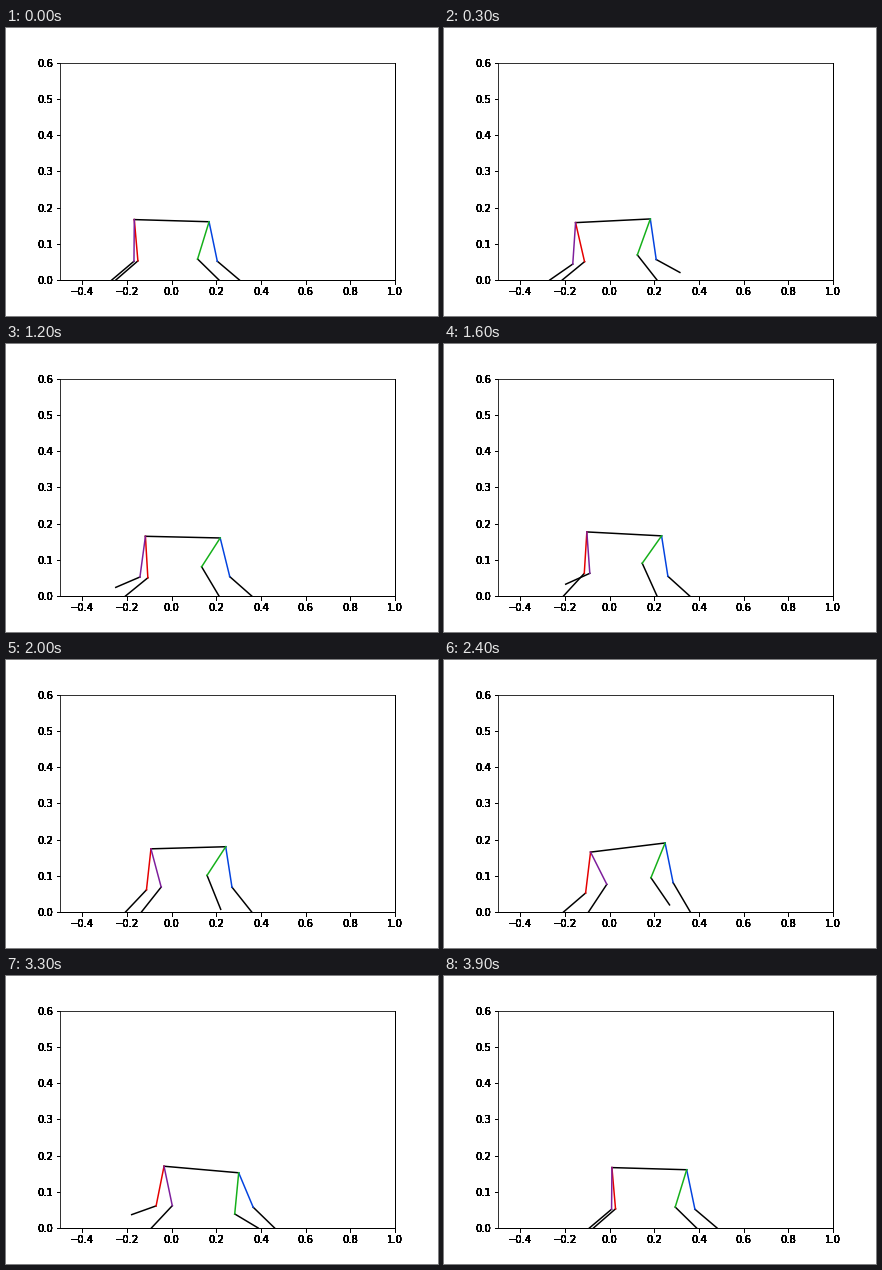
These frames come from a looping animation (432x288 px, 4 s). A matplotlib script:

```python
import numpy as np
import matplotlib.pyplot as plt
from matplotlib.animation import FuncAnimation

FRAMES, INTERVAL = 40, 100
PERIOD = 39          # frames in one full gait cycle
STRIDE = 0.1775      # distance covered per cycle
BODY, THIGH, SHIN = 0.335, 0.115, 0.112

t = np.arange(FRAMES, dtype=float)


def ease(u):
    u = np.clip(u, 0, 1)
    return u * u * (3 - 2 * u)


def bob(*extremes):
    """Periodic height easing between (time, height) extremes."""
    (first_t, first_y), (last_t, last_y) = extremes[0], extremes[-1]
    x, y = np.array([(last_t - PERIOD, last_y), *extremes,
                     (first_t + PERIOD, first_y)]).T
    i = np.searchsorted(x, t, side="right") - 1
    return y[i] + (y[i + 1] - y[i]) * ease((t - x[i]) / (x[i + 1] - x[i]))


def glide(start, length, dist=STRIDE):
    """Forward move made once per cycle."""
    return dist * (sum(ease((t - start - k * PERIOD) / length) for k in (-1, 0, 1)) - 1)


def lift(start, length, height):
    """Foot clearance: one arch per cycle."""
    u = (t - start) % PERIOD / length
    return height * np.sin(np.pi * np.clip(u, 0, 1))


def knee(hip, foot, side):
    """Knee position of a two-bar leg; side picks the bend direction."""
    delta = foot - hip
    dist = np.hypot(*delta)
    ux, uy = delta / dist
    along = (THIGH ** 2 - SHIN ** 2 + dist ** 2) / (2 * dist)
    off = np.sqrt(np.maximum(THIGH ** 2 - along ** 2, 0))
    return hip + along * np.array([ux, uy]) + side * off * np.array([-uy, ux])


# Hips: steady advance with a surge, each end bobbing on its own
phase = 2 * np.pi * t / PERIOD
rear_x = (-0.179 + STRIDE * t / PERIOD
          + 0.0144 * np.cos(phase - 1.02) + 0.005 * np.cos(2 * phase + 0.5))
rear_y = bob((7, .152), (17, .1775), (28, .160), (35, .173))
front_y = bob((5, .1705), (12.5, .160), (25, .191), (34, .151))
front_x = rear_x + np.sqrt(BODY ** 2 - (front_y - rear_y) ** 2)
rear = np.array([rear_x, rear_y])
front = np.array([front_x, front_y])

# Feet
red_foot = np.array([-.2065 + glide(29.5, 14), lift(27.5, 11.5, .037)])
purple_foot = np.array([-.268 + glide(8.7, 16.8), lift(9.5, 10.5, .035)])
green_foot = np.array([.2124 + glide(18, 16), lift(18.5, 12.5, .02)])
# The blue foot makes a short hop, then drags the rest of the stride
HOP = 0.055
blue_foot = np.array([.304 + glide(0, 10.5, HOP) + glide(22.8, 13.7, STRIDE - HOP),
                      lift(0, 11, .0275)])

LEGS = [("xkcd:red", rear, red_foot, 1), ("xkcd:blue", front, blue_foot, -1),
        ("xkcd:purple", rear, purple_foot, 1), ("xkcd:green", front, green_foot, -1)]

fig = plt.figure(figsize=(6, 4), dpi=72)
# Stacked identical axes give the heavy labels
for _ in range(12):
    ax = fig.add_axes([0.125, 0.125, 0.775, 0.755])
    ax.set(xlim=(-0.5, 1.0), ylim=(0, 0.6),
           xticks=np.linspace(-0.4, 1.0, 8), yticks=np.linspace(0, 0.6, 7))

# Each segment: artist, start joint path, end joint path
segments = [(ax.plot([], [], color="black")[0], rear, front)]
for color, hip, foot, side in LEGS:
    joint = knee(hip, foot, side)
    segments.append((ax.plot([], [], color="black")[0], joint, foot))
    segments.append((ax.plot([], [], color=color)[0], hip, joint))


def update(i):
    for line, a, b in segments:
        line.set_data([a[0, i], b[0, i]], [a[1, i], b[1, i]])
    return [s[0] for s in segments]


anim = FuncAnimation(fig, update, frames=FRAMES, interval=INTERVAL,
                     init_func=lambda: update(0), repeat=True, repeat_delay=0)
plt.show()
```
